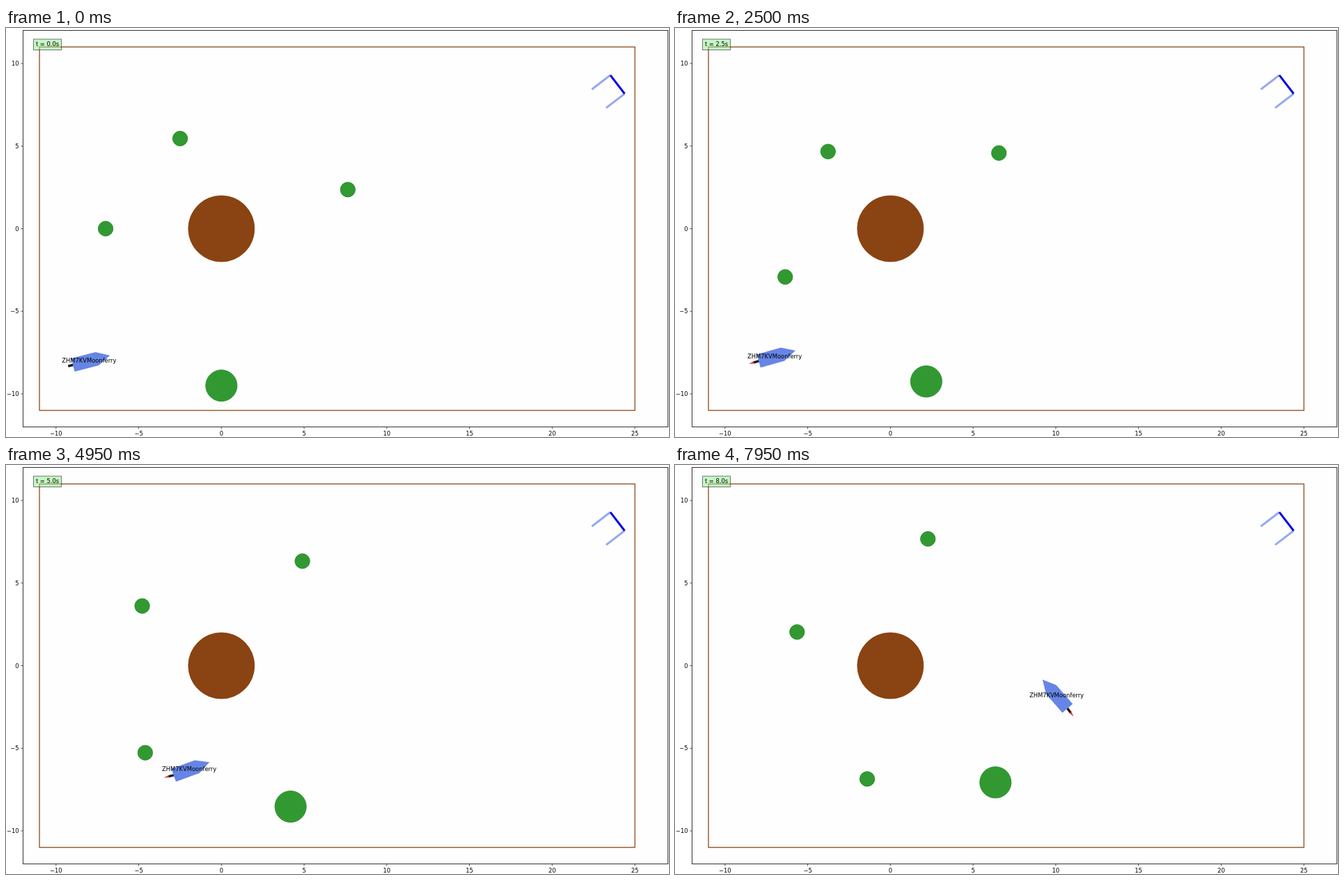
An HTML page with a canvas for the animation above (8000 ms loop, 952 by 588 pixels).

```html
<!DOCTYPE html>
<html lang="en">
<head>
<meta charset="utf-8">
<title>Spaceship docking</title>
<style>
  html, body { margin: 0; width: 100%; height: 100%; overflow: hidden; background: #fff; }
  canvas { display: block; width: 952px; height: 588px; }
</style>
</head>
<body>
<canvas id="stage" width="952" height="588"></canvas>
<script>
const ctx = document.getElementById('stage').getContext('2d');
const LOOP = 8000, STEP = 50, UNIT = 23.75;
const FONT = '8.35px "DejaVu Sans", sans-serif';
const SHIP_NAME = 'ZHM7KVMoonferry';
const px = x => 309.3 + UNIT * x;
const py = y => 288.5 - UNIT * y;
const rad = deg => deg * Math.PI / 180;

const planets = [
  { orbit: 7, start: Math.PI, speed: 0.1722, size: 0.45 },
  { orbit: 6, start: 2, speed: 0.1, size: 0.45 },
  { orbit: 8, start: 0.3, speed: 0.1237, size: 0.45 },
  { orbit: 9.5, start: -Math.PI / 2, speed: 0.0921, size: 0.95 }
];

// Ship controls: angles in degrees, thrust in pixels per second squared
const bump = (t, mid, width) => Math.exp(-(((t - mid) / width) ** 2));
const throttle = t => Math.min(1, t / 1.8);
const thrust = t => throttle(t) * (16.75 + 0.55 * t);
const heading = t => 14.3 + 0.6 * t + 5.35 * Math.max(0, t - 4.2) ** 2.3;
const gimbal = t => 3.5 * bump(t, 3.3, 0.7) - 10.5 * bump(t, 6.3, 1.7) - 0.4;

// Integrates the thrust from rest to give the ship's position
function shipAt(time) {
  const dt = 0.01, steps = Math.round(time / dt);
  let x = px(-8), y = py(-8), vx = 0, vy = 0;
  for (let i = 0; i < steps; i++) {
    const t = (i + 0.5) * dt;
    const angle = rad(heading(t) + gimbal(t));
    const ax = thrust(t) * Math.cos(angle), ay = -thrust(t) * Math.sin(angle);
    x += (vx + ax * dt / 2) * dt;
    y += (vy + ay * dt / 2) * dt;
    vx += ax * dt;
    vy += ay * dt;
  }
  return [x, y];
}

function line(color, width, ...pts) {
  ctx.strokeStyle = color;
  ctx.lineWidth = width;
  ctx.beginPath();
  pts.forEach(([x, y]) => ctx.lineTo(x, y));
  ctx.stroke();
}

// Fills a shape mirrored about the x axis, given its upper half
function mirrored(color, ...half) {
  const lower = half.map(([x, y]) => [x, -y]).reverse();
  ctx.fillStyle = color;
  ctx.beginPath();
  [...half, ...lower].forEach(([x, y]) => ctx.lineTo(x, y));
  ctx.fill();
}

function disc(x, y, r, fill, edge) {
  ctx.beginPath();
  ctx.arc(px(x), py(y), r * UNIT, 0, 2 * Math.PI);
  ctx.fillStyle = fill;
  ctx.fill();
  ctx.strokeStyle = edge;
  ctx.lineWidth = 0.8;
  ctx.stroke();
}

function label(text, x, y, align) {
  ctx.fillStyle = '#000';
  ctx.textAlign = align;
  ctx.fillText(text, x, y);
}

function drawAxes() {
  const name = v => String(v).replace('-', '\u2212');
  for (let v = -10; v <= 25; v += 5) {
    line('#222', 0.8, [px(v), 573.5], [px(v), 576.5]);
    label(name(v), px(v), 586.2, 'center');
    if (v > 10) continue;
    line('#222', 0.8, [21.5, py(v)], [24.5, py(v)]);
    label(name(v), 18.5, py(v) + 3.1, 'right');
  }
  ctx.strokeStyle = '#333';
  ctx.lineWidth = 1;
  ctx.strokeRect(24.5, 3.5, 926, 570);
}

function drawBorder() {
  ctx.strokeStyle = '#8b4a1a';
  ctx.lineWidth = 1.3;
  ctx.strokeRect(px(-11), py(11), 36 * UNIT, 22 * UNIT);
}

function drawDock() {
  const a = [867.8, 67.8], b = [888.3, 94.5];
  for (const [x, y] of [a, b]) line('#96a9ee', 3, [x, y], [x - 26.6, y + 20.4]);
  line('#0404e4', 3, a, b);
}

function drawShip(t) {
  const [x, y] = shipAt(t);
  const tip = -7.3 - 7.5 * throttle(t);
  ctx.save();
  ctx.translate(x, y);
  ctx.rotate(-rad(heading(t)));
  ctx.save();
  ctx.translate(-UNIT, 0);
  ctx.rotate(-rad(gimbal(t)));
  mirrored('#e8303a', [-7, -1.8], [tip, 0]);
  mirrored('#16161c', [0.5, -1.7], [-7.3, -1.7]);
  ctx.restore();
  mirrored('#6685e6', [30.9, 0], [11.9, -9.8], [-23.9, -9.8]);
  ctx.restore();
  label(SHIP_NAME, x, y + 2.3, 'center');
}

function drawClock(t) {
  ctx.fillStyle = 'rgba(144, 238, 144, 0.5)';
  ctx.fillRect(39.5, 16, 40, 15.5);
  ctx.strokeStyle = 'rgba(0, 0, 0, 0.5)';
  ctx.lineWidth = 1;
  ctx.strokeRect(39.5, 16, 40, 15.5);
  label(`t = ${(t + 0.001).toFixed(1)}s`, 42.9, 26.3, 'left');
}

function draw(t) {
  ctx.fillStyle = '#fff';
  ctx.fillRect(0, 0, 952, 588);
  ctx.fillStyle = '#fefefe';
  ctx.fillRect(24, 3, 927, 571);
  ctx.font = FONT;
  drawAxes();
  drawBorder();
  disc(0, 0, 2, '#8a4312', '#8a4312');
  for (const { orbit, start, speed, size } of planets) {
    const a = start + speed * t;
    disc(orbit * Math.cos(a), orbit * Math.sin(a), size, '#329932', '#1f8a1f');
  }
  drawDock();
  drawShip(t);
  drawClock(t);
}

function tick() {
  const step = Math.floor((performance.now() % LOOP) / STEP);
  draw(step * STEP / 1000);
  requestAnimationFrame(tick);
}
tick();
</script>
</body>
</html>
```
